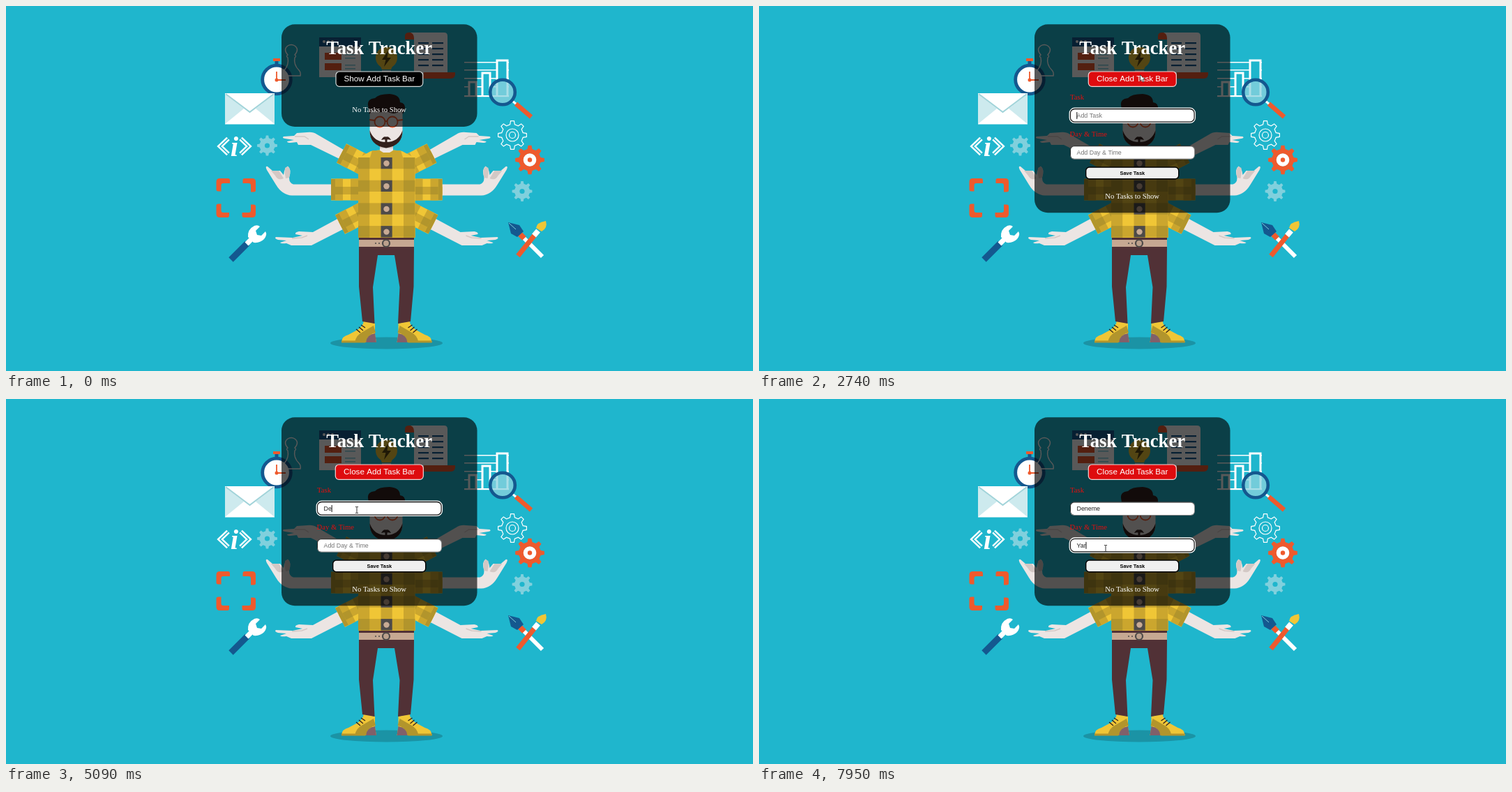
Recreate the animation shown at these times as an HTML page with a canvas. Size 1071 px wide and 523 px high, loop 8 s.

```html
<!DOCTYPE html>
<html lang="en">
<head>
<meta charset="utf-8">
<title>Task Tracker</title>
<style>
html, body { margin: 0; width: 100%; height: 100%; overflow: hidden; background: #1fb6cd; }
canvas { display: block; }
</style>
</head>
<body>
<canvas id="stage" width="1071" height="523"></canvas>
<script>
const W = 1071, H = 523, LOOP = 8000;
const BG = '#1fb6cd', WHITE = '#fff', BLUE = '#14588f', ORANGE = '#ee5a2d', PALE = '#80d0dd',
  YELLOW = '#f0c636', MID = '#cba62e', DARK = '#b2952c', SKIN = '#ece5e3', SHADE = '#d3c8c5',
  HAIR = '#33201c', PANTS = '#513136', GREY = '#4d4a49';
const SERIF = '"Liberation Serif", serif', SANS = '"Liberation Sans", sans-serif';

const stage = document.getElementById('stage').getContext('2d');
const art = document.createElement('canvas');
art.width = W; art.height = H;
let c = art.getContext('2d');

// drawing helpers
function fill(d, color) { c.fillStyle = color; c.fill(new Path2D(d)); }
function line(d, color, width = 1) {
  c.strokeStyle = color; c.lineWidth = width; c.stroke(new Path2D(d));
}
function rect(x, y, w, h, color) { c.fillStyle = color; c.fillRect(x, y, w, h); }
function disc(x, y, r, color, edge, width) {
  c.beginPath(); c.arc(x, y, r, 0, 7);
  if (color) { c.fillStyle = color; c.fill(); }
  if (edge) { c.strokeStyle = edge; c.lineWidth = width; c.stroke(); }
}
function box(x, y, w, h, r, color, edge, width = 1) {
  c.beginPath(); c.roundRect(x, y, w, h, r);
  c.fillStyle = color; c.fill();
  if (edge) { c.strokeStyle = edge; c.lineWidth = width; c.stroke(); }
}
function text(s, x, y, font, color, align = 'left') {
  c.font = font; c.fillStyle = color; c.textAlign = align; c.fillText(s, x, y);
}
function placed(x, y, angle, draw) {
  c.save(); c.translate(x, y); c.rotate(angle); draw(); c.restore();
}
function bothSides(draw) {
  draw();
  c.save(); c.translate(1091.5, 0); c.scale(-1, 1); draw(); c.restore();
}

function gear(x, y, r, hole, color, outline) {
  const teeth = 8, step = Math.PI * 2 / teeth;
  c.beginPath();
  for (let i = 0; i < teeth; i++) {
    for (const [k, q] of [[-.28, .76], [-.15, 1], [.15, 1], [.28, .76]]) {
      const a = (i + k) * step;
      c.lineTo(x + Math.cos(a) * r * q, y + Math.sin(a) * r * q);
    }
  }
  c.closePath();
  if (outline) {
    c.strokeStyle = color; c.lineWidth = 1.2; c.stroke();
    disc(x, y, hole, null, color, 1.2);
    disc(x, y, hole * .5, null, color, 1.2);
  } else {
    c.fillStyle = color; c.fill();
    disc(x, y, hole, BG);
  }
}

function leftIcons() {
  // stopwatch
  rect(383, 75, 10, 4, ORANGE); rect(385.5, 79, 5, 4, BLUE);
  disc(388, 105.5, 20.3, WHITE, BLUE, 4.8);
  line('M388 94V106H401', ORANGE, 1.8); disc(388, 106, 2.5, ORANGE);
  // pawn
  line('M404 70Q397 62 404 57Q409 54 414 57Q421 62 414 70Q417 72 414 74Q412 84 420 92Q423 95 422 100H397Q396 95 399 92Q406 84 404 74Q401 72 404 70Z', WHITE, 1.4);
  // envelope
  rect(314, 125, 71, 44.5, WHITE);
  fill('M314 126L341 147L314 169ZM385 126L358 147L385 169Z', '#cdeaee');
  line('M315 126L349.5 152L384 126', '#a0d3d9', 2);
  // code tag
  const chevrons = 'M318.5 190L307 201L318.5 212M336.500 190L348 201L336.500 212';
  line(chevrons, WHITE, 6.5); line(chevrons, BG, 1.6);
  text('i', 327.5, 215, `italic bold 41px ${SERIF}`, WHITE, 'center');
  gear(374.5, 200, 14.5, 3.6, PALE);
  // focus brackets
  for (const [x, y, a] of [[301.5, 247, 0], [358, 247, 1], [358, 303, 2], [301.5, 303, 3]])
    placed(x, y, a * Math.PI / 2, () => fill('M0 5Q0 0 5 0H17Q19.500 0 19.500 3V7H10Q7 7 7 10V18.500H3Q0 18.500 0 16Z', ORANGE));
  // wrench
  line('M322.500 363.500L346 340', BLUE, 9);
  line('M345 341L354 332', WHITE, 7);
  fill('M347 331Q346 320 356 315Q361 313 364 316L358 322L360 328L366 329L372 323Q375 328 370 334Q364 340 355 339Z', WHITE);
}

function topIcons() {
  // browser window
  rect(449, 45, 60, 57, WHITE); rect(449, 45, 60, 13, BLUE);
  for (const x of [456, 462, 468]) disc(x, 51, 2, WHITE);
  rect(457, 67, 24, 10, ORANGE); rect(457, 82, 24, 10, ORANGE);
  for (const y of [69, 74, 84, 89]) rect(486, y, 15, 1.5, PALE);
  // bulb
  disc(545.5, 74, 15.5, YELLOW);
  fill('M536 84H555L552 91H539Z', YELLOW);
  fill('M548 64L539 77H544.500L542 87L552 74H546.500Z', '#5a4512');
  rect(539, 92, 13, 2.5, '#d8e4e6'); rect(540, 95.5, 11, 2.5, '#d8e4e6');
  // scroll
  fill('M572 48V43Q572 38 578 38H585V48Z', ORANGE);
  fill('M580 38H628Q633 38 633 43V99H585V46Q585 40 580 38Z', WHITE);
  fill('M599 95H644Q645 104 637 104H591Q599 103 599 95Z', ORANGE);
  for (let y = 52; y < 87; y += 8) { rect(591, y, 15, 2.2, BLUE); rect(611, y, 16, 2.2, BLUE); }
}

function rightIcons() {
  // chart
  for (const y of [80, 91, 103, 115]) rect(657, y, 64, 1.5, WHITE);
  for (const [x, y, w] of [[664, 109, 10], [683, 96, 11], [704, 78, 15]]) {
    rect(x, y, w, 51, BG);
    line(`M${x} 129V${y}h${w}V129`, WHITE, 3);
  }
  rect(657, 128, 64, 2.2, WHITE);
  // magnifier
  line('M726 136L732 141', WHITE, 3);
  line('M731 140L753 159', ORANGE, 6.5);
  c.globalAlpha = .75; disc(712, 123.5, 17.5, '#8ed3df'); c.globalAlpha = 1;
  disc(712, 123.5, 17.8, null, BLUE, 4.6);
  gear(726, 185, 20.5, 9, WHITE, true);
  gear(751, 220.5, 21, 9, ORANGE); disc(751, 220.5, 9.3, WHITE); disc(751, 220.5, 3.2, ORANGE);
  gear(740, 265.5, 14.5, 3.6, PALE);
  // pen and brush
  line('M742 332L769 359', WHITE, 6);
  line('M737 327L743 333', ORANGE, 8);
  fill('M720 310L736 314L742 323L733 331L724 326Z', BLUE);
  line('M721 311L731 320', PALE, 1);
  line('M734 358L759 327', ORANGE, 7);
  line('M757 329L763 322', WHITE, 7.5);
  fill('M760 318Q761 310 774 308Q777 318 768 323Z', YELLOW);
}

function sleeve(x, y, degrees) {
  placed(x, y, degrees * Math.PI / 180, () => {
    rect(0, -15.5, 43, 31, YELLOW);
    for (const px of [6, 28]) rect(px, -15.5, 11, 31, MID);
    rect(0, -4, 43, 11, MID);
    for (const px of [6, 28]) rect(px, -4, 11, 11, DARK);
    rect(0, -15, 6, 30, DARK);
  });
}

function arms() {
  // upper
  fill('M484 206L446 184Q440 180 432 181L417 182L413 186L398 187Q395 189 400 190L413 192L403 194Q403 196 408 196L417 195L419 199L437 199L478 219Z', SKIN);
  line('M414 187L428 187L434 191', SHADE, 1.5);
  sleeve(481, 211, 27);
  // middle
  fill('M470 255.500H412Q406 254 406 246Q410 234 404 229.500Q399 232 398 242L393 236L382 236L375 230Q371 229 374 235L387 256Q396 271 410 271.500H470Z', SKIN);
  fill('M380 236H391L398 247Q390 251 386 243ZM400 232Q399 240 401 247L406 246Q409 234 404 230Z', SHADE);
  sleeve(466, 263, 0);
  // lower
  fill('M477 304L440 324L420 323Q414 324 415 327L425 329L411 332L387 331Q384 333 390 335L402 336L393 339Q394 341 402 340L409 343L438 343L483 320Z', SKIN);
  line('M410 333L424 332L432 329', SHADE, 1.5);
  sleeve(479, 313, -27);
}

function legs() {
  c.fillStyle = '#1b93a5'; c.beginPath(); c.ellipse(545.5, 483, 80.5, 8.5, 0, 0, 7); c.fill();
  bothSides(() => {
    fill('M481 481Q482 473 491 471L504 464Q512 459 513 451L529 455V470L531 482H481Z', YELLOW);
    fill('M500 482Q502 471 513 466L527 458L530 468Q520 469 516 482Z', DARK);
    fill('M516 482Q517 471 529 469L531 482Z', '#80606a');
    rect(481, 479.5, 34, 3, DARK);
    line('M502 463L508 468M506 460L512 465M509 457L515 461', HAIR, 1.3);
  });
  fill('M506 344H585L584.500 402L580 452L562 455L564.500 403L557 357H533L526 403L528.500 455L511 452L506 402Z', PANTS);
}

function torso() {
  rect(536, 198, 19, 12, SHADE);
  fill('M505 218L523 208Q545 204 568 208L586.500 218Z', YELLOW);
  fill('M522 217L525 207H566L569 217Z', MID);
  fill('M536 204H555V207L550 210H541L536 207Z', SKIN);
  rect(505, 217, 81.5, 115, YELLOW);
  for (const x of [505, 537.5, 570]) rect(x, 217, 16.2, 115, MID);
  for (let y = 217; y < 330; y += 32.7) {
    rect(505, y, 81.5, 16.3, MID);
    for (const x of [505, 570]) rect(x, y, 16.2, 16.3, DARK);
    rect(537.5, y, 16.2, 16.3, GREY);
    disc(545.5, y + 8.5, 4.2, '#c8aa94');
  }
  rect(506, 332, 79, 3.5, PANTS); rect(506, 335, 79, 10, '#c6a892');
  for (const x of [530, 535]) disc(x, 340, 1, GREY);
  disc(545, 340, 5, '#bba08c', GREY, 2.2);
}

function head() {
  fill('M521.500 146H568.500V182Q566 200 545 203Q524 200 521.500 182Z', SKIN);
  // beard and moustache
  fill('M521.500 178Q527 195 545 195Q563 195 568.500 178Q569 200 545 203.500Q521 200 521.500 178Z', HAIR);
  fill('M538 192Q541 186 545 187.500Q549 186 552 192Q548 191 546.500 191.500V197H543.500V191.500Q542 191 538 192Z', HAIR);
  // hair and glasses
  fill('M521 155L519 142Q518 133 529 132Q534 126 550 126Q565 127 565 138Q573 139 572 148L569 155L567 148Q558 158 546 151Q534 154 525 150Z', HAIR);
  for (const x of [536, 554]) disc(x, 166, 7.5, null, ORANGE, 1.8);
  line('M543 165H547M521 163L529 164M561 164L569 163', ORANGE, 1.8);
}

rect(0, 0, W, H, BG);
leftIcons(); topIcons(); rightIcons();
legs(); bothSides(arms); torso(); head();

// timeline
const OPEN = 2740, SECOND = 6740;
const KEYS_TASK = [[4820, 'D'], [5020, 'De'], [5160, 'Den'], [5220, 'Dene'], [5420, 'Denem'], [5550, 'Deneme']];
const KEYS_DAY = [[7670, 'Y'], [7810, 'Ya'], [7950, 'Yar']];
const CARET_RESETS = [OPEN, 3750, SECOND, ...KEYS_TASK.map(k => k[0]), ...KEYS_DAY.map(k => k[0])];
const POINTER = [[650, 1041, 503], [1420, 672, 124], [1630, 644, 105], [2260, 552, 93], [2600, 546, 98],
  [3260, 546, 98], [3750, 503, 159], [6100, 503, 159], [6610, 497, 214], [LOOP, 497, 214]];

function typed(keys, t) { return keys.reduce((s, [at, v]) => t >= at ? v : s, ''); }
function caretOn(t) {
  const since = Math.max(...CARET_RESETS.filter(r => r <= t));
  return Math.floor((t - since) / 530) % 2 === 0;
}
function pointerAt(t) {
  const i = POINTER.findIndex(p => p[0] > t);
  const [t0, x0, y0] = POINTER[i - 1], [t1, x1, y1] = POINTER[i];
  const k = Math.floor((t - t0) / 70) * 70 / (t1 - t0);
  const e = k * k * (3 - 2 * k);
  return [x0 + (x1 - x0) * e, y0 + (y1 - y0) * e];
}

function field(y, value, hint, focused, t) {
  if (focused) {
    box(445.2, y - 1.3, 180.2, 21.2, 7.5, '#101010', WHITE, 1.3);
    box(447, y + .7, 176.5, 17.2, 5.5, WHITE);
  } else {
    box(446, y, 179, 19.5, 6, '#8a8a8a');
    box(446, y, 178, 18.5, 6, '#222');
    box(447, y + 1, 177, 17.5, 5, WHITE);
  }
  text(value || hint, 455.5, y + 12.2, `8.9px ${SANS}`, value ? '#222' : '#757575');
  if (focused && caretOn(t)) rect(455.3 + (value ? c.measureText(value).width : 0), y + 4.5, 1, 10, '#111');
}

function form(t) {
  const label = `10.67px ${SERIF}`, red = '#e40f0f';
  text('Task', 446, 134, label, red);
  field(147.5, typed(KEYS_TASK, t), 'Add Task', t < SECOND, t);
  text('Day & Time', 445.5, 187, label, red);
  field(200.3, typed(KEYS_DAY, t), 'Add Day & Time', t >= SECOND, t);
  box(468.7, 231, 133, 16.7, 5, '#efefef', '#000', 1.4);
  text('Save Task', 535.3, 242, `bold 7.4px ${SANS}`, '#000', 'center');
}

function pointer(t) {
  if (t < POINTER[0][0]) return;
  const [x, y] = pointerAt(t);
  const inField = t > OPEN && x > 446 && x < 625 && (y > 148 && y < 167 || y > 200 && y < 220);
  placed(x, y, 0, () => {
    if (inField) line('M-2 -4.500H-.5L0 -4L.5 -4.500H2M0 -4V4M-2 4.500H-.5L0 4L.5 4.500H2', '#333', 1);
    else {
      const arrow = 'M.5 .5V9.500L2.600 7.600L4.200 11L5.800 10.300L4.300 7H7Z';
      fill(arrow, WHITE); line(arrow, '#222', .7);
    }
  });
}

function draw(t) {
  c.drawImage(art, 0, 0);
  const open = t >= OPEN;
  box(395, 26.3, 280.5, open ? 270 : 146.7, 19, 'rgba(0,0,0,.65)');
  text('Task Tracker', 535.2, 69, `bold 26.67px ${SERIF}`, WHITE, 'center');
  if (open) box(472.3, 94, 126, 21.3, 5, '#de0b0e', '#f3d5d5', 1.2);
  else box(473, 94, 124.7, 21.3, 5, '#000', '#d8dede', 1.2);
  text(open ? 'Close Add Task Bar' : 'Show Add Task Bar', 535.3, 108.3, `11.67px ${SANS}`, WHITE, 'center');
  if (open) form(t);
  text('No Tasks to Show', 535.2, open ? 275.5 : 152, `10.67px ${SERIF}`, WHITE, 'center');
  pointer(t);
}

c = stage;
const start = performance.now();
function tick() {
  draw((performance.now() - start) % LOOP);
  requestAnimationFrame(tick);
}
tick();
</script>
</body>
</html>
```
